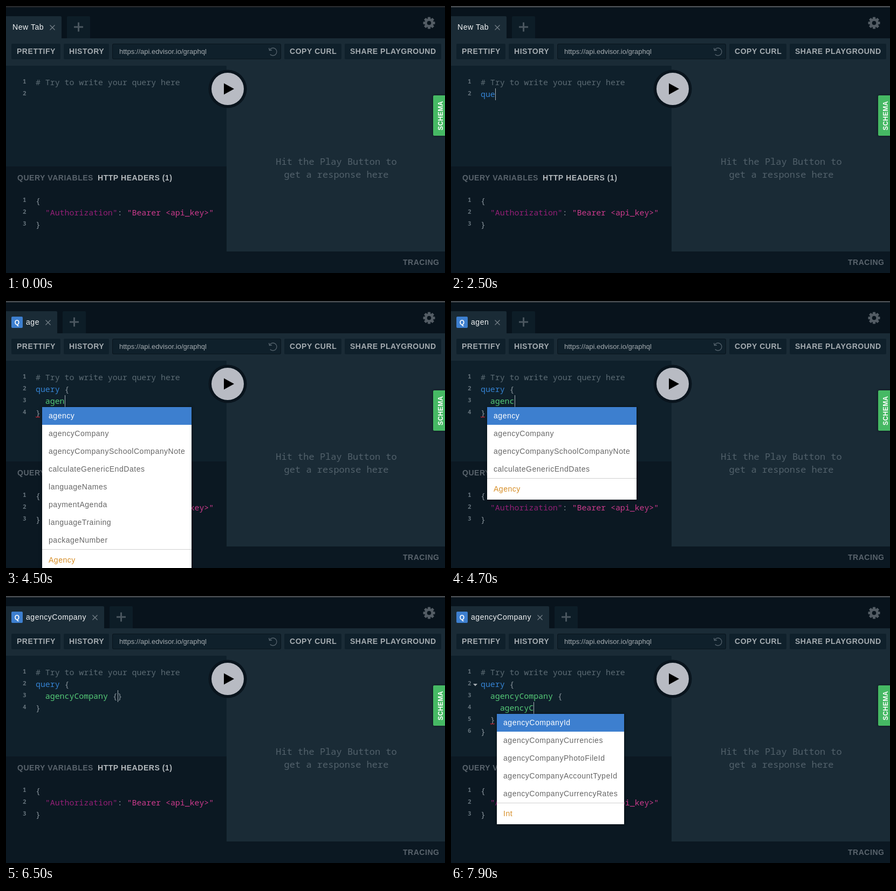
An HTML page with a canvas for the animation above (8 s loop, 814 by 496 pixels).

```html
<!DOCTYPE html>
<html lang="en">
<head>
<meta charset="utf-8">
<title>GraphQL playground</title>
<style>
html, body { margin: 0; width: 100%; height: 100%; overflow: hidden; background: #0b1822; }
canvas { display: block; }
</style>
</head>
<body>
<canvas id="stage" width="814" height="496"></canvas>
<script>
const ctx = document.getElementById('stage').getContext('2d');
const LOOP = 8000, TAB_LAG = 250;
const SANS = '"Liberation Sans", Arial, sans-serif';
const MONO = '"Noto Sans Mono", "DejaVu Sans Mono", monospace';
const CODE = '14.88px ' + MONO, LABEL = '14px ' + SANS, BOLD = 'bold 14px ' + SANS;
const CHAR = 8.93, LEFT = 55, ROW = 22;
const C = {
  bar: '#08131c', panel: '#1a2b36', editor: '#0f202b', vars: '#0b1822',
  comment: '#5b6a73', punct: '#87929a', keyword: '#3583d3', field: '#55c977',
  key: '#931f76', value: '#cb3a8c', blue: '#3d7fcf', muted: '#59636c', button: '#a4abb0'
};

const ROOT_FIELDS = ['agency', 'agencyCompany', 'agencyCompanySchoolCompanyNote',
  'calculateGenericEndDates', 'languageNames', 'paymentAgenda', 'languageTraining', 'packageNumber'];
const COMPANY_FIELDS = ['agencies', 'agencyCompanyId', 'agencyCompanyCurrencies',
  'agencyCompanyPhotoFileId', 'agencyCompanyAccountTypeId', 'agencyCompanyCurrencyRates',
  'additionalPercentage'];
const TYPES = { agency: 'Agency', agencyCompany: 'AgencyCompany', agencies: '[Agency]', agencyCompanyId: 'Int' };

function rect(x, y, w, h, color, radius = 0) {
  ctx.fillStyle = color;
  ctx.beginPath();
  ctx.roundRect(x, y, w, h, radius);
  ctx.fill();
}

function circle(x, y, r, color) {
  ctx.fillStyle = color;
  ctx.beginPath();
  ctx.arc(x, y, r, 0, 7);
  ctx.fill();
}

function path(points, color, width) {
  ctx.beginPath();
  points.forEach(([x, y]) => ctx.lineTo(x, y));
  if (width) {
    ctx.strokeStyle = color;
    ctx.lineWidth = width;
    ctx.stroke();
  } else {
    ctx.fillStyle = color;
    ctx.fill();
  }
}

function text(str, x, y, color, font = LABEL, spacing = 0.53, align = 'left') {
  ctx.font = font;
  ctx.letterSpacing = spacing + 'px';
  ctx.textAlign = align;
  ctx.fillStyle = color;
  ctx.fillText(str, x, y);
  return ctx.measureText(str).width;
}

const shadow = blur => {
  ctx.shadowColor = 'rgba(0,0,0,.55)';
  ctx.shadowBlur = blur;
};

// Part of a string that has been typed by time t
const typed = (str, t, start, step) =>
  str.slice(0, Math.max(0, Math.floor((t - start) / step) + 1));

const rootField = t => t >= 5900 ? 'agencyCompany'
  : typed('agenc', t, 3850, 200) + typed('yComp', t, 4800, 150);
const childField = t => typed('ag', t, 7150, 100) + typed('encyC', t, 7410, 80);

function tabName(t) {
  return t >= 6300 && !childField(t) ? '' : rootField(t);
}

function matches(name, query) {
  let i = 0;
  for (const ch of name.toLowerCase()) if (ch === query[i]) i++;
  return i === query.length;
}

// Each line is a list of [text, color] pieces
function queryLines(t) {
  const lines = [[['# Try to write your query here', C.comment]]];
  const head = typed('query {', t, 2200, 150);
  const open = [[head.slice(0, 5), C.keyword], [head.slice(5), C.punct]];
  if (t < 3400) {
    if (head.endsWith('{')) open.push(['}', C.punct]);
    return [...lines, open];
  }
  lines.push(open);
  const tail = typed(' {', t, 6150, 150);
  const root = [['  ' + rootField(t), C.field], [tail, C.punct]];
  lines.push(root);
  if (t >= 6600) lines.push([['    ' + childField(t), C.field]], [['  }', C.punct]]);
  else if (tail.endsWith('{')) root.push(['}', C.punct]);
  lines.push([['}', C.punct]]);
  return lines;
}

function caretAt(t) {
  if (t < 3400) return [typed('query {', t, 2200, 150).length, 1];
  if (t < 6600) return [2 + rootField(t).length + typed(' {', t, 6150, 150).length, 2];
  return [4 + childField(t).length, 3];
}

function drawCode(lines, top) {
  lines.forEach((pieces, i) => {
    const y = top + i * ROW;
    let x = LEFT;
    text(i + 1, 37.5, y - 3, '#65737c', 'bold 11px ' + MONO, 0, 'right');
    for (const [str, color] of pieces) x += text(str, x, y, color, CODE, 0);
  });
}

function squiggle(col, row, count) {
  const x = LEFT + col * CHAR, y = 171 + (row - 1) * ROW, points = [];
  for (let d = 0; d <= count * CHAR; d += 2) points.push([x + d, y + d % 4 / 2]);
  path(points, '#c02434', 1.2);
}

function drawHints(all, query, x, y) {
  const items = all.filter(name => matches(name, query.toLowerCase()));
  if (!items.length) return;
  ctx.font = LABEL;
  ctx.letterSpacing = '0.53px';
  const width = Math.round(Math.max(...items.map(name => ctx.measureText(name).width)) + 24);
  const bottom = y + items.length * 33;
  ctx.save();
  shadow(5);
  rect(x, y, width, items.length * 33 + 40, '#fff');
  ctx.restore();
  rect(x, y, width, 33, C.blue);
  items.forEach((name, i) => text(name, x + 12, y + 21 + i * 33, i ? '#666' : '#fff'));
  rect(x, bottom, width, 1, '#d0d0d0');
  text(TYPES[items[0]] || 'String', x + 12, bottom + 25, '#d68d25');
}

function drawGear(x, y) {
  ctx.save();
  ctx.translate(x, y);
  for (let i = 0; i < 8; i++) {
    rect(-2.6, -11, 5.2, 6, '#535c64', 1);
    ctx.rotate(Math.PI / 4);
  }
  circle(0, 0, 8.3, '#535c64');
  circle(0, 0, 3.8, C.bar);
  ctx.restore();
}

function drawTabs(t) {
  const name = tabName(t - TAB_LAG), label = name || 'New Tab', x = name ? 37 : 12;
  ctx.font = LABEL;
  ctx.letterSpacing = '0.53px';
  const end = Math.round(x + ctx.measureText(label).width + 33);
  rect(0, 19, end, 41, C.panel, [0, 2, 0, 0]);
  if (name) {
    rect(10, 29, 21, 21, C.blue, 2);
    text('Q', 20.5, 44, '#fff', 'bold 12px ' + SANS, 0, 'center');
  }
  text(label, x, 44, '#f2f4f5');
  const cx = end - 17, cy = 40;
  path([[cx - 4.5, cy - 4.5], [cx + 4.5, cy + 4.5]], '#748088', 1.2);
  path([[cx - 4.5, cy + 4.5], [cx + 4.5, cy - 4.5]], '#748088', 1.2);
  rect(end + 10, 19, 43, 41, '#0d1d27', [2, 2, 0, 0]);
  rect(end + 23, 37.5, 17, 3, '#4a565f');
  rect(end + 30, 30.5, 3, 17, '#4a565f');
}

function drawToolbar() {
  rect(0, 60, 814, 51, C.panel);
  for (const [label, x, width] of [['PRETTIFY', 10, 91], ['HISTORY', 107, 84],
    ['COPY CURL', 516, 106], ['SHARE PLAYGROUND', 628, 179]]) {
    rect(x, 70, width, 29, C.editor, 2);
    text(label, x + 10, 89, C.button, BOLD);
  }
  rect(197, 70, 313, 29, '#09141d', 3);
  rect(198, 71, 311, 27, C.editor, 2);
  text('https://api.edvisor.io/graphql', 210, 89, '#a4abb0', '13px ' + SANS, 0);
  ctx.strokeStyle = '#56646e';
  ctx.lineWidth = 1.3;
  ctx.beginPath();
  ctx.arc(495, 85, 7, -2.7, 2.4);
  ctx.stroke();
  path([[487.5, 78], [488.5, 82.5], [493, 82]], '#56646e', 1.3);
}

function drawPanels() {
  rect(0, 0, 814, 496, C.vars);
  rect(0, 0, 814, 60, C.bar);
  rect(0, 111, 409, 187, C.editor);
  rect(409, 111, 405, 345, C.panel);
  drawGear(784.5, 31.5);
  text('QUERY VARIABLES', 21, 324, C.muted, BOLD);
  text('HTTP HEADERS (1)', 170, 324, '#b3b9bd', BOLD);
  text('TRACING', 736, 481, C.muted, BOLD);
  ['Hit the Play Button to', 'get a response here'].forEach((line, i) =>
    text(line, 612.5, 295 + i * 24, '#52616b', '17px ' + MONO, 0, 'center'));
}

function drawSchema() {
  ctx.save();
  shadow(4);
  rect(792, 166, 24, 75, '#46b964', [2, 0, 0, 2]);
  ctx.restore();
  ctx.save();
  ctx.translate(810, 231);
  ctx.rotate(-Math.PI / 2);
  text('SCHEMA', 0, 0, '#fff', 'bold 12px ' + SANS, 0.45);
  ctx.restore();
}

function drawPlay() {
  circle(411, 154, 35.5, '#09141d');
  circle(411, 154, 30, '#b8bbc3');
  path([[404, 143.5], [423, 154], [404, 164.5]], '#000');
}

function draw(t) {
  drawPanels();
  rect(0, 0, 814, 2.5, t < 100 ? '#27292c' : '#484c50');
  drawTabs(t);
  drawToolbar();
  drawCode(queryLines(t), 147);
  drawCode([
    [['{', C.punct]],
    [['  "Authorization"', C.key], [': ', C.punct], ['"Bearer <api_key>"', C.value]],
    [['}', C.punct]]
  ], 367);

  if (t >= 3000 && t < 3850) squiggle(0, 1, 5);
  if (t >= 3850 && t < 5950) squiggle(0, 3, 1);
  if (t >= 7000) squiggle(2, 4, 1);
  if (t >= 6600) path([[41, 163], [49, 163], [45, 167.5]], '#a4abb0');
  if (t >= 2000) {
    const [col, row] = caretAt(t);
    rect(Math.round(LEFT + col * CHAR), 131 + row * ROW, 1, 22, '#a9b2b8');
  }

  if (t < 5900) {
    const query = rootField(t);
    if (query) drawHints(ROOT_FIELDS, query, 67, 197);
  } else if (childField(t)) {
    drawHints(COMPANY_FIELDS, childField(t), 85, 219);
  }
  drawPlay();
  drawSchema();
}

function tick() {
  draw(performance.now() % LOOP);
  requestAnimationFrame(tick);
}
tick();
</script>
</body>
</html>
```
